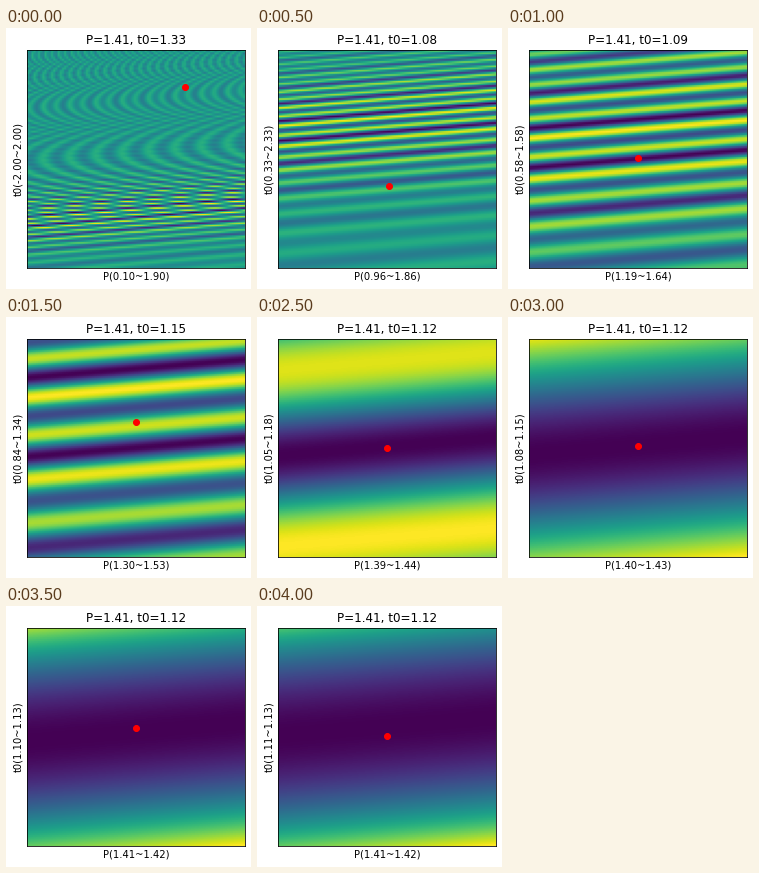
A matplotlib script that plays this animation: 245x261 px, repeating every 4.5 s.

```python
import numpy as np
import matplotlib.pyplot as plt
from matplotlib.animation import FuncAnimation

W, H, DPI = 245, 261, 72
LEFT, BOTTOM, SIDE = 21.2, 21.25, 217.44
GRID = 100
LEVELS = 9
SPAN = np.array([1.8, 4.0])   # search widths of P and t0, halved every level
TILT = 0.184                  # drift of the valleys in t0 per unit of P
RATE, DECAY = 10.2, 0.72      # stripes per unit of t0, and how fast they widen

# best (P, t0) at each level; the next level is centred on it
P_BEST = [1.406] + [1.414] * (LEVELS - 1)
T_BEST = [1.33, 1.08, 1.087, 1.147, 1.1153, 1.1154, 1.116, 1.1173, 1.1174]
BEST = np.column_stack([P_BEST, T_BEST])
CENTRES = np.vstack([(1.0, 0.0), BEST[:-1]])


def error(s):
    """Chirped ripple with a half-rate partner, deepest at s = 0."""
    turns = 2 * np.pi * RATE * (1 - np.exp(-DECAY * s)) / DECAY
    envelope = 0.2 + 0.8 * np.exp(-((s + 0.1) / 0.55) ** 2)
    ripple = 0.43 * np.cos(turns) + 0.12 * np.cos(turns / 2 + 0.3)
    return -envelope * ripple


def landscape(level):
    p_span, t_span = SPAN / 2 ** level
    step = np.linspace(-0.5, 0.5, GRID)
    dp, dt = np.meshgrid(step * p_span, step * t_span)
    focus = CENTRES[max(level, 2), 1]
    return error(CENTRES[level, 1] - focus + dt + TILT * dp)


fig = plt.figure(figsize=(W / DPI, H / DPI), dpi=DPI, facecolor="white")
ax = fig.add_axes([LEFT / W, BOTTOM / H, SIDE / W, SIDE / H])
image = ax.imshow(landscape(0), cmap="viridis", extent=(0, 1, 0, 1),
                  aspect="auto")
dot, = ax.plot([], [], "ro", markersize=6)
ax.set(xlim=(0, 1), ylim=(0, 1), xticks=[], yticks=[])


def draw(level):
    span = SPAN / 2 ** level
    low = CENTRES[level] - span / 2
    high = low + span
    best = BEST[level]
    u, v = (best - low) / span
    image.set_data(landscape(level))
    image.autoscale()
    dot.set_data([u], [v])
    ax.set_title(f"P={best[0]:.2f}, t0={best[1]:.2f}")
    ax.set_xlabel(f"P({low[0]:.2f}~{high[0]:.2f})")
    ax.set_ylabel(f"t0({low[1]:.2f}~{high[1]:.2f})")
    return image, dot


anim = FuncAnimation(fig, draw, frames=LEVELS, interval=500, repeat=True,
                     repeat_delay=0, init_func=lambda: draw(0), blit=False)
plt.show()
```
